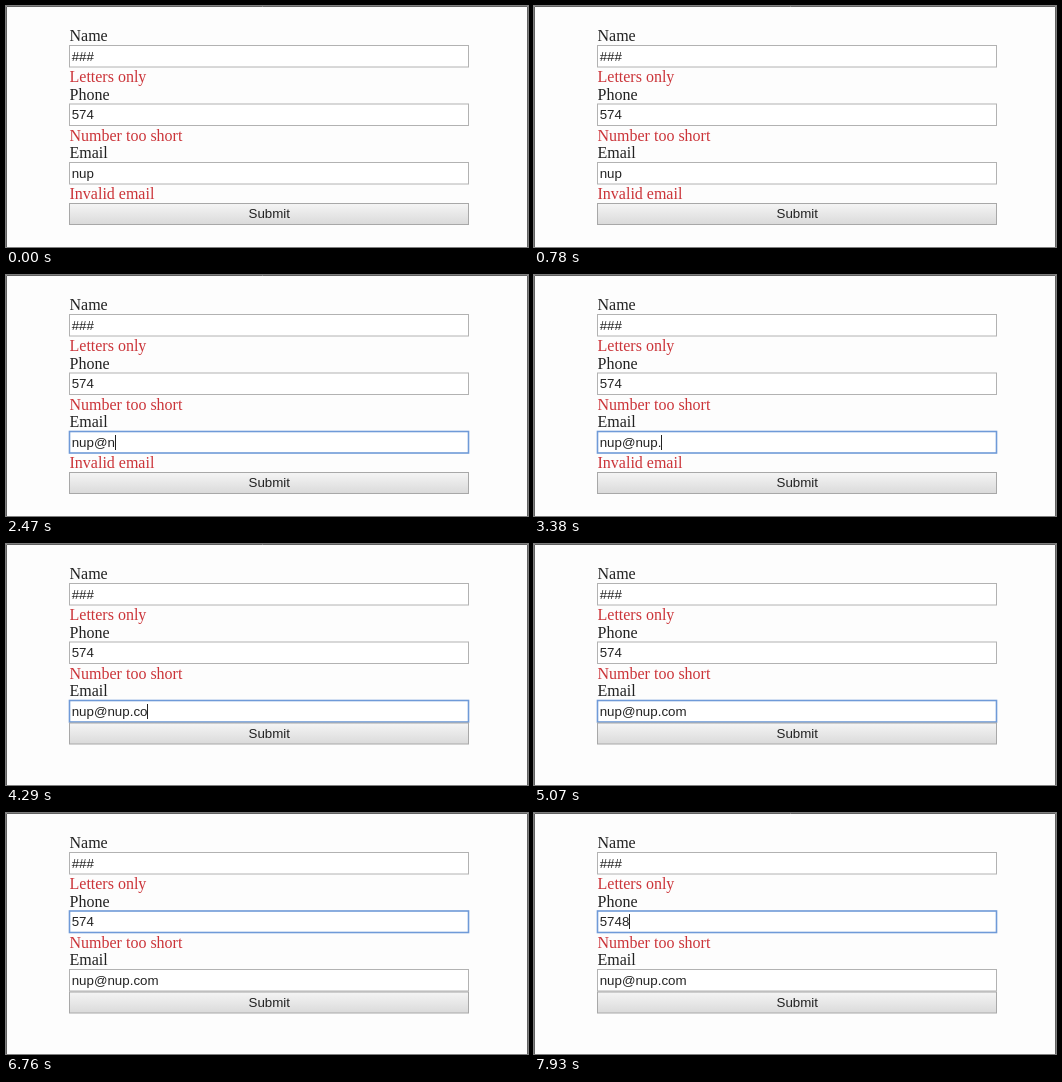
These frames come from a looping animation (522x241 px, 8000 ms). An HTML page:

```html
<!DOCTYPE html>
<html lang="en">
<head>
<meta charset="utf-8">
<title>Form validation</title>
<style>
  html, body { margin: 0; width: 100%; height: 100%; overflow: hidden; background: #fdfdfd; }
  svg { display: block; }
  text { fill: #222; white-space: pre; }
  .label, .error { font: 16px "Liberation Serif", "Times New Roman", serif; }
  .error { fill: #cb3439; }
  .value, .button { font: 13.333px "Liberation Sans", Arial, sans-serif; }
  .box { fill: #fff; stroke: #b2b2b2; }
  .focus { stroke: #6f9ad8; stroke-width: 1.6; }
</style>
</head>
<body>
<svg width="522" height="241" viewBox="0 0 522 241">
  <defs>
    <linearGradient id="shade" x2="0" y2="1">
      <stop stop-color="#f5f5f5"/>
      <stop offset="1" stop-color="#dadada"/>
    </linearGradient>
  </defs>
  <path d="M.5 241V.5H521.5V241" fill="none" stroke="#626262"/>
  <g id="form"></g>
  <g id="submit">
    <rect x="63.5" y="197.5" width="399" height="21" fill="url(#shade)" stroke="#a8a8a8"/>
    <text class="button" x="263.3" y="212" text-anchor="middle">Submit</text>
  </g>
  <rect id="caret" width="1" height="15" fill="#222"/>
</svg>
<script>
const LOOP = 8000, BLINK = 500;
const $ = id => document.getElementById(id);

function add(tag, attrs, content = '') {
  const el = document.createElementNS('http://www.w3.org/2000/svg', tag);
  for (const key in attrs) el.setAttribute(key, attrs[key]);
  el.textContent = content;
  return $('form').appendChild(el);
}

function makeField(label, error, y) {
  add('text', { class: 'label', x: 63.5, y: y + 35 }, label);
  return {
    y,
    box: add('rect', { x: 63.5, y: y + 39.5, width: 399, height: 21.5 }),
    value: add('text', { class: 'value', x: 65.7, y: y + 54.5 }),
    error: add('text', { class: 'error', x: 63.5, y: y + 76 }, error)
  };
}

const fields = [
  makeField('Name', 'Letters only', 0),
  makeField('Phone', 'Number too short', 58.5),
  makeField('Email', 'Invalid email', 117)
];
const [name, phone, email] = fields;
name.value.textContent = '###';

// Each entry: time, focused field, phone text, email text
const steps = [
  [0, null, '574', 'nup'],
  [1040, email, '574', 'nup'],
  [2080, email, '574', 'nup@'],
  [2470, email, '574', 'nup@n'],
  [2600, email, '574', 'nup@nu'],
  [2860, email, '574', 'nup@nup'],
  [3250, email, '574', 'nup@nup.'],
  [3770, email, '574', 'nup@nup.c'],
  [4160, email, '574', 'nup@nup.co'],
  [4550, email, '574', 'nup@nup.com'],
  [6240, phone, '574', 'nup@nup.com'],
  [7540, phone, '5748', 'nup@nup.com']
];

function draw(now) {
  const t = now % LOOP;
  const [start, focus, number, address] = steps.findLast(step => step[0] <= t);
  phone.value.textContent = number;
  email.value.textContent = address;
  for (const field of fields)
    field.box.setAttribute('class', field === focus ? 'box focus' : 'box');

  const valid = /@\w+\.\w{2,}$/.test(address);
  email.error.style.display = valid ? 'none' : '';
  $('submit').setAttribute('transform', `translate(0 ${valid ? -18.5 : 0})`);

  const caretOn = focus && (t - start) % (2 * BLINK) < BLINK;
  $('caret').style.display = caretOn ? '' : 'none';
  if (caretOn) {
    $('caret').setAttribute('x', Math.round(65.7 + focus.value.getComputedTextLength()));
    $('caret').setAttribute('y', Math.round(focus.y + 42.5));
  }
  requestAnimationFrame(draw);
}
requestAnimationFrame(draw);
</script>
</body>
</html>
```
